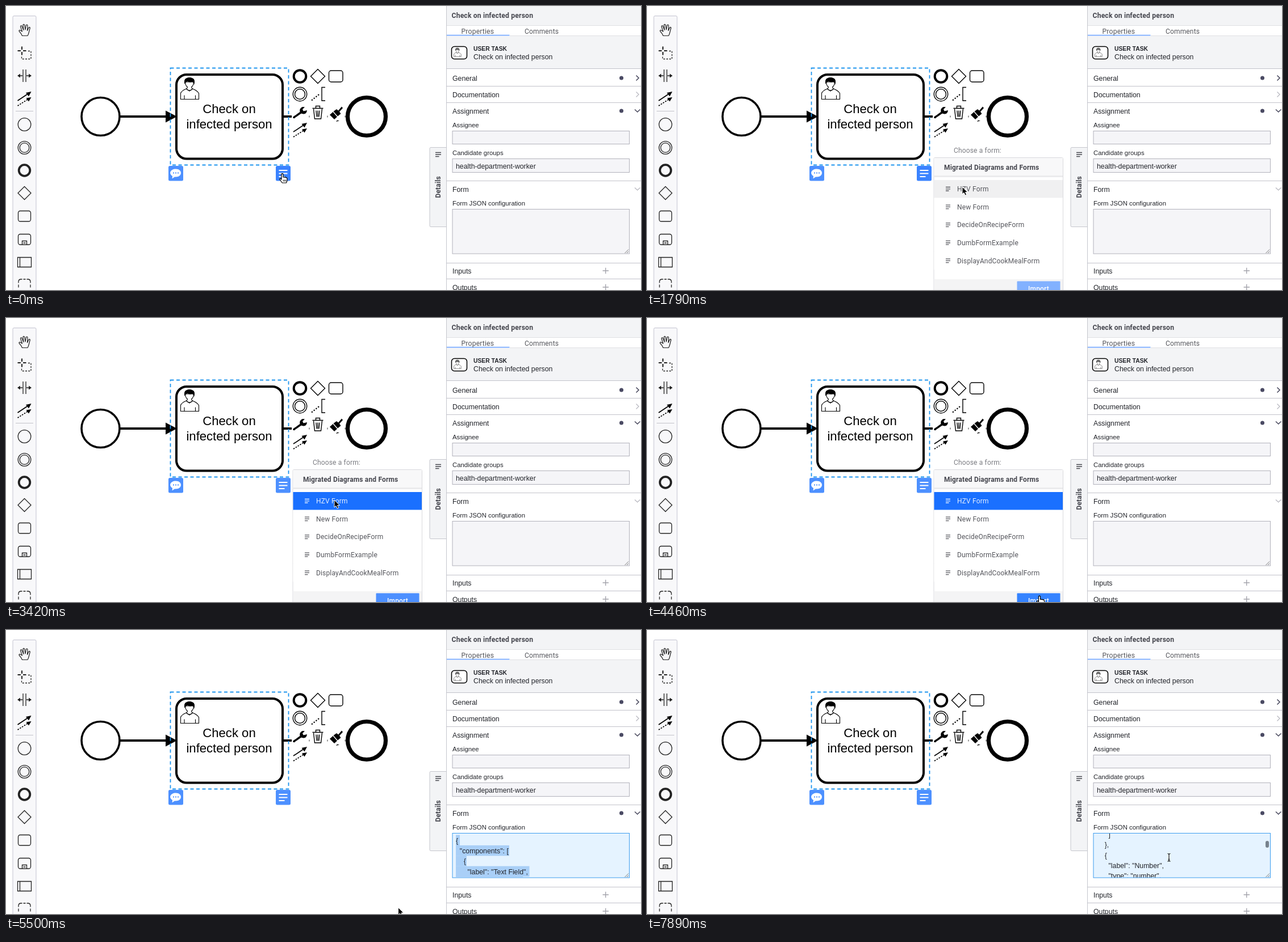
Recreate the animation shown at these times as an HTML page. Size 1118 by 501 pixels, loop 8 s.

```html
<!DOCTYPE html>
<html lang="en">
<head>
<meta charset="utf-8">
<title>Process modeler</title>
<style>
html, body { margin: 0; width: 100%; height: 100%; overflow: hidden; background: #fff; }
svg { display: block; width: 1118px; height: 501px; }
text { font: 12.3px "Liberation Sans", Arial, sans-serif; fill: #22242a; white-space: pre; }
.ui { font: 12px Roboto, sans-serif; letter-spacing: .16px; fill: #55565c; }
.b { font-weight: 600; fill: #45464e; }
.sm { font-size: 11.35px; }
.task { font-size: 22.1px; text-anchor: middle; fill: #000; }
.ink { fill: none; stroke: #000; stroke-width: 1.4; }
.tool { fill: none; stroke: #222; stroke-width: 1.3; }
.field { fill: #f5f5f8; stroke: #b2b2bb; }
.rule { stroke: #c2c2ca; fill: none; }
.chev { fill: none; stroke: #45455a; stroke-width: 1.5; }
.pale { stroke: #b5b5bd; stroke-width: 1.2; }
.plus { stroke: #a4a4ac; stroke-width: 1.4; fill: none; }
.dot { fill: #4a4a63; }
.focus .field { fill: #e5f3ff; stroke: #3c9cee; }
.sel { fill: #a9cff7; }
.row rect { fill: #fff; }
.row path { stroke: #55565c; stroke-width: 1.3; }
.hover rect { fill: #f0f0f1; }
.picked rect { fill: #1a70ff; }
.picked text { fill: #e4eeff; }
.picked path { stroke: #e4eeff; }
</style>
</head>
<body>
<svg viewBox="0 0 1118 501">
<defs>
  <g id="user" stroke="#000" stroke-width="1.1">
    <path fill="#fff" d="M307.5 164.500V154q1.500-4.500 10-8l5.500 4 5.500-4q8.500 3.500 11 8v10.500zM314 164.500v-7M333.500 164.500v-7"/>
    <path fill="#fff" d="M315.500 134q0 6 4 9l-1.500 3.500q5 5 10 0l-1.500-3.500q4-3 4-9z"/>
    <path d="M315 137q-2.500-10 8-10.500 10.500 .5 8 10.500-1-3.500-3.500-4-4 2-7.500-.5-4 .5-5 4.500z"/>
  </g>
  <g id="links">
    <path class="ink" style="stroke-width:1.700" d="M-12 4L6-8"/>
    <path d="M12-12L7.500-3.500 2.500-10z"/>
    <path class="ink" style="stroke-width:1.700" stroke-dasharray="2.500 2" d="M-12 13L7 1"/>
    <path d="M12-2L7.500 5.500 3-.5z"/>
  </g>
  <clipPath id="area"><path d="M786.500 359h310.500v77.500h-310.500z"/></clipPath>
</defs>

<!-- palette -->
<rect x="12" y="17.500" width="41" height="500" rx="2" fill="#f8f8fa" stroke="#c3c3d0"/>
<path class="rule" d="M17 185.500h31"/>
<g class="tool">
  <path stroke-width="1.200" stroke-linejoin="round" d="M28.500 52.500q-1-3.500-5-7.500-1.500-2.500 1-2.500l4 2.500-3-8.500q0-2.500 2.200-1.500l3.200 7.500-1-9q1.300-2.300 2.700 0l1.400 8.500 1.300-8q1.700-2 2.700 0l-.5 9.500 2.500-5.500q2-1.500 2.300 .5l-2 8q-1 4-2.300 6z"/>
  <path stroke-width="2" d="M20.500 79h5.500M30 79h5.500M28 71.500v5.500M28 81v5.500"/>
  <path stroke-dasharray="3 2.200" d="M39 79.500h5v14H27.500v-6"/>
  <path d="M30 112v22M35 112v22M21 123h8M36 123h8"/>
  <path fill="#222" stroke="none" d="M20 123l5-3.500v7zM45 123l-5-3.500v7z"/>
  <circle cx="32.500" cy="209" r="11.300"/>
  <circle cx="32.500" cy="250" r="11.300"/><circle cx="32.500" cy="250" r="8.300"/>
  <circle cx="32.500" cy="290" r="9.800" stroke-width="3.800"/>
  <path d="M32.500 318.500L44 330 32.500 341.500 21 330z"/>
  <rect x="21.500" y="361.500" width="22" height="18.500" rx="3.500"/>
  <rect x="21.500" y="402.500" width="22" height="18.500" rx="3.500"/>
  <path d="M28.500 421v-6.500h8V421M30.500 418h4"/>
  <path d="M20.500 443.500h24v17h-24zM24.500 443.500v17"/>
  <path d="M22 488.500v-2q0-4.500 4.500-4.500h2M36.500 482h2q4.500 0 4.500 4.500v2M30.500 482h4M22 491.500v5M43 491.500v5"/>
</g>
<use href="#links" x="32.500" y="163"/>

<!-- diagram -->
<circle class="ink" cx="166.500" cy="195" r="33.500" style="stroke-width:3.600"/>
<path class="ink" style="stroke-width:4" d="M201 195h82M487 195h16"/>
<path d="M281 184.500L301 195 281 205.500z"/>
<path stroke="#999" stroke-width="3" d="M533 195h2M565 195h2M596 195h3"/>
<rect x="300" y="121" width="187" height="148.500" rx="18" fill="#fff" stroke="#000" stroke-width="4"/>
<use href="#user"/>
<text class="task" x="393" y="188.500">Check on</text>
<text class="task" x="393" y="215.500">infected person</text>
<rect x="289.500" y="109.500" width="208" height="171" fill="none" stroke="#1c94ee" stroke-width="1.800" stroke-dasharray="6 4.500"/>
<circle cx="635" cy="195" r="33.500" fill="#fff" stroke="#000" stroke-width="7.200"/>

<!-- context pad -->
<g class="ink">
  <circle cx="517.500" cy="124" r="10.800" style="stroke-width:4"/>
  <path d="M549 111.500L561.500 124 549 136.500 536.500 124z"/>
  <rect x="568.500" y="114" width="24.500" height="20" rx="4"/>
  <circle cx="517.500" cy="155.500" r="12.200"/><circle cx="517.500" cy="155.500" r="9"/>
  <path stroke-dasharray="2.300 2.500" style="stroke-width:2.200" d="M538 166.500l15-12"/>
  <path d="M562 143.500h-6v23.500h6"/>
  <path d="M541.500 181.500l2 17.500h11l2-17.500M539.500 180.500h19M545.500 180v-3.500h7v3.500M546 184.500l1 11M549 184.500v11M552 184.500l-1 11"/>
  <path style="stroke-width:3.400" stroke-linecap="round" d="M507 196.500l12-8.500"/>
</g>
<path d="M517.500 187.500q-1.500-7 4.500-9.500l4 .3-4 4 1.700 3.200 6.300-1.500q-.5 5.500-5 6.500-4 .5-7.500-3z"/>
<path d="M591 177.500l2 2.500-6 6.500 2.500 3.500-5.500 4.500-7.500-8.500 5.500-4 3 2.500zM575.500 187l7.500 8.500-5 4.500-8-8zM581 204l6-1.500-4-1z"/>
<use href="#links" x="518" y="218"/>

<!-- overlay buttons -->
<rect x="286" y="282" width="26" height="26.500" rx="2.500" fill="#4d90ff"/>
<path fill="#fff" d="M299 287.500c12 0 12 14 0 14l-2 0-4.500 3 .5-4.500c-7-4-4-12.500 6-12.500z"/>
<path stroke="#4d90ff" stroke-width="2" stroke-dasharray="2 2" d="M294 294.500h10"/>
<rect id="formBtn" x="475" y="282" width="26" height="26.500" rx="2.500"/>
<path stroke="#fff" stroke-width="2" d="M480.500 290h15M480.500 295.500h15M480.500 301h10"/>

<!-- side panel -->
<path fill="#f3f4f6" stroke="#c5c6cd" d="M775.500 249.500H748q-2 0-2 2v136q0 2 2 2h27.500z"/>
<path stroke="#45464e" stroke-width="1.500" d="M756 258.500h10M756 262h10M756 265.500h6.500"/>
<text class="ui b" transform="translate(765 338.500) rotate(-90)">Details</text>
<rect x="775.500" y="-1" width="345" height="504" fill="#fff" stroke="#c5c6cd"/>
<path fill="#f3f4f6" d="M776 0h342v34.500H776zM776 53h342v57.500H776z"/>
<path class="rule" d="M775 110.500h343M775 141.500h343M775 170.500h343M775 308.500h343M775 453.500h343M775 481.500h343"/>
<path stroke="#e0e0e4" d="M776 34.500h342M887 52.500h231"/>
<path stroke="#78aaff" stroke-width="1.800" d="M776 51.700h110.500"/>
<text class="ui b" style="font-size:12.200px" x="784.500" y="21">Check on infected person</text>
<text class="ui" style="font-size:12.200px" x="801.500" y="49">Properties</text>
<text class="ui" x="913" y="49">Comments</text>
<rect x="784.500" y="71.500" width="27" height="22" rx="5" fill="#fff" stroke="#000" stroke-width="1.500"/>
<use href="#user" fill="#777" transform="translate(665.500 23.500) scale(.4)"/>
<text x="823" y="79" style="font-size:10.350px;font-weight:bold">USER TASK</text>
<text x="823" y="93.500">Check on infected person</text>
<text x="786" y="131.500">General</text>
<text x="786" y="160.500">Documentation</text>
<text x="786" y="189.500">Assignment</text>
<text class="sm" x="786" y="214">Assignee</text>
<rect class="field" x="786" y="220.500" width="311.500" height="23"/>
<text class="sm" x="786" y="263">Candidate groups</text>
<rect class="field" x="786" y="269.500" width="311.500" height="24"/>
<text x="792" y="286.500">health-department-worker</text>
<text x="786" y="327.500">Form</text>
<text class="sm" x="786" y="352">Form JSON configuration</text>
<text x="786" y="471.500">Inputs</text>
<text x="786" y="500.500">Outputs</text>
<path class="plus" d="M1050.500 467h10.500M1055.700 461.700v10.500M1050.500 496h10.500M1055.700 490.700v10.500"/>
<circle class="dot" cx="1083.500" cy="127" r="3.500"/>
<circle class="dot" cx="1083.500" cy="185" r="3.500"/>
<circle class="dot" id="formDot" cx="1083.500" cy="323" r="3.500"/>
<path class="chev" d="M1109.500 122.500l4.500 4.500-4.500 4.500M1107 182.500l4.700 4.500 4.700-4.500"/>
<path class="chev pale" d="M1109.500 151.500l4.500 4.500-4.500 4.500"/>
<path class="chev" id="formChev" d="M1107 320.500l4.700 4.500 4.700-4.500"/>

<g id="box">
  <rect class="field" x="786" y="358.500" width="311.500" height="78.500"/>
  <g clip-path="url(#area)">
    <g id="marks"></g>
    <g id="json"></g>
  </g>
  <path stroke="#777" d="M1089.500 436l6.500-6.500M1093 436l3-3"/>
  <rect id="thumb" x="1089" width="6" height="12" rx="3" fill="#77828d"/>
</g>

<!-- form chooser -->
<g id="popup">
  <text class="ui" style="fill:#7b7c82" x="540" y="258.500">Choose a form:</text>
  <rect x="505" y="267.500" width="227.500" height="240" rx="2" fill="#fff" stroke="#d9d9dd"/>
  <path fill="#f8f8f9" d="M505.500 268h226.500v31H505.500z"/>
  <path fill="#ebebed" d="M505.500 299h226.500v3H505.500z"/>
  <text class="ui b" x="523" y="289">Migrated Diagrams and Forms</text>
  <g id="rows"></g>
  <path fill="#f4f4f5" d="M505.500 482h226.500v20H505.500z"/>
  <rect id="import" x="651.500" y="485.500" width="76" height="30" rx="1"/>
  <text class="ui" style="fill:#fff;font-weight:500" x="671" y="503">Import</text>
</g>

<!-- pointers -->
<g id="arrow"><path stroke="#fff" d="M0 0V13L3 10.300 5.200 15 7.600 14 5.500 9.500H9.500z"/></g>
<g id="hand">
  <path fill="#fff" stroke="#000" stroke-width="1.200" stroke-linejoin="round" d="M-1.500 0q1.500-1.500 3 0v5.500q1.500-1 2.500 .3 1.500-.8 2.400 .5 1.800-.5 2.100 1.500v4l-1.500 3.700h-7.200l-4.300-6q-.5-2 1.500-1.500l1.500 1.500z"/>
  <path stroke="#000" d="M1.800 10v3M4 10v3M6.200 10v3"/>
</g>
<g id="beam" fill="none">
  <path stroke="#fff" stroke-width="2.400" d="M0-5V5"/>
  <path stroke="#111" stroke-width="1.200" d="M-2.500-6.500q2.500 0 2.500 2 0-2 2.500-2M0-4.500v9.500M-2.500 7q2.500 0 2.500-2 0 2 2.500 2M-1.500 3.500h3"/>
</g>
</svg>

<script>
const $ = id => document.getElementById(id);
const SVG = 'http://www.w3.org/2000/svg';
const LOOP = 8000, LINE = 18.35, ROW = 31.65;

function add(parent, tag, attrs, text = '') {
  const el = document.createElementNS(SVG, tag);
  for (const k in attrs) el.setAttribute(k, attrs[k]);
  el.textContent = text;
  parent.append(el);
  return el;
}

const forms = ['HZV Form', 'New Form', 'DecideOnRecipeForm', 'DumbFormExample', 'DisplayAndCookMealForm'];
const rows = forms.map((name, i) => {
  const y = 307 + i * ROW;
  const g = add($('rows'), 'g', {});
  add(g, 'rect', { x: 505.5, y, width: 226.5, height: ROW });
  add(g, 'path', { d: `M526 ${y + 12.5}h8M526 ${y + 15.8}h8M526 ${y + 19}h5.500` });
  add(g, 'text', { class: 'ui', x: 546, y: y + 20 }, name);
  return g;
});

const json = `{
  "components": [
    {
      "label": "Text Field",
      "type": "textfield",
      "id": "Field_0h3k1ab",
      "key": "textfield1",
      "validate": [
        "required",
        "text"
      ]
    },
    {
      "label": "Number",
      "type": "number",
      "id": "Field_1c8m2de",`.split('\n');
json.forEach((s, i) => add($('json'), 'text', { x: 792, y: 375.5 + i * LINE }, s));
[7, 94, 19, 129.5, 118].forEach((width, i) =>
  add($('marks'), 'rect', { class: 'sel', x: 792, y: 361.5 + i * LINE, width, height: LINE + .2 }));

// time, x, y, pointer
const pointer = [
  [0, 486.5, 296.5, 'hand'],
  [900, 514, 308, 'arrow'], [1050, 546, 318, 'arrow'], [1190, 558, 319, 'arrow'],
  [1790, 555, 319, 'arrow'], [1940, 566, 342, 'arrow'], [2090, 596, 388, 'arrow'],
  [2230, 638, 436, 'arrow'], [2380, 676, 474, 'arrow'], [2530, 698, 492, 'arrow'],
  [2820, 656, 398, 'arrow'], [2970, 623, 359, 'arrow'], [3120, 594, 333, 'arrow'],
  [3270, 578, 321, 'arrow'],
  [3720, 602, 356, 'arrow'], [3870, 670, 464, 'arrow'], [4010, 690, 510, 'arrow'],
  [4310, 692, 495, 'hand'], [4460, 691, 491, 'hand'],
  [5060, 690.5, 489.5, 'arrow'],
  [6100, 704, 482, 'arrow'], [6250, 752, 454, 'arrow'], [6400, 818, 422, 'beam'],
  [6540, 878, 405, 'beam'], [6690, 910, 400, 'beam'], [6840, 919, 401, 'beam']
];
// time, hovered row
const hover = [[0, -1], [1050, 0], [1940, 1], [2090, 2], [2230, 4], [2380, -1], [2820, 2], [3120, 0],
  [3720, 1], [3870, 4], [4010, -1]];
// time, scrolled height
const scroll = [[0, 0], [7440, 22], [7590, 84], [7740, 156], [7890, 194]];

const at = (steps, t) => steps.findLast(s => s[0] <= t);
const show = (id, on) => { $(id).style.display = on ? '' : 'none'; };

function draw(t) {
  const [, x, y, kind] = at(pointer, t);
  for (const id of ['arrow', 'hand', 'beam']) show(id, id === kind);
  $(kind).setAttribute('transform', `translate(${x} ${y})`);

  const over = at(hover, t)[1], picked = t >= 3420;
  rows.forEach((g, i) => g.setAttribute('class',
    'row' + (picked && i === 0 ? ' picked' : i === over ? ' hover' : '')));
  show('popup', t >= 300 && t < 5060);
  $('formBtn').setAttribute('fill', picked ? '#4d90ff' : '#3a83ff');
  $('import').setAttribute('fill', !picked ? '#82b1ff' : t < 4310 ? '#4d90ff' : '#3583ff');

  const focus = t >= 5500, top = at(scroll, t)[1];
  $('box').setAttribute('class', focus ? 'focus' : '');
  $('formChev').setAttribute('class', focus ? 'chev' : 'chev pale');
  show('formDot', focus);
  show('marks', focus && t < 6840);
  show('json', t >= 5210);
  $('json').setAttribute('transform', `translate(0 ${-top})`);
  show('thumb', top > 0);
  $('thumb').setAttribute('y', 361 + top * 11 / 194);
}

function tick() {
  draw(performance.now() % LOOP);
  requestAnimationFrame(tick);
}
tick();
</script>
</body>
</html>
```
